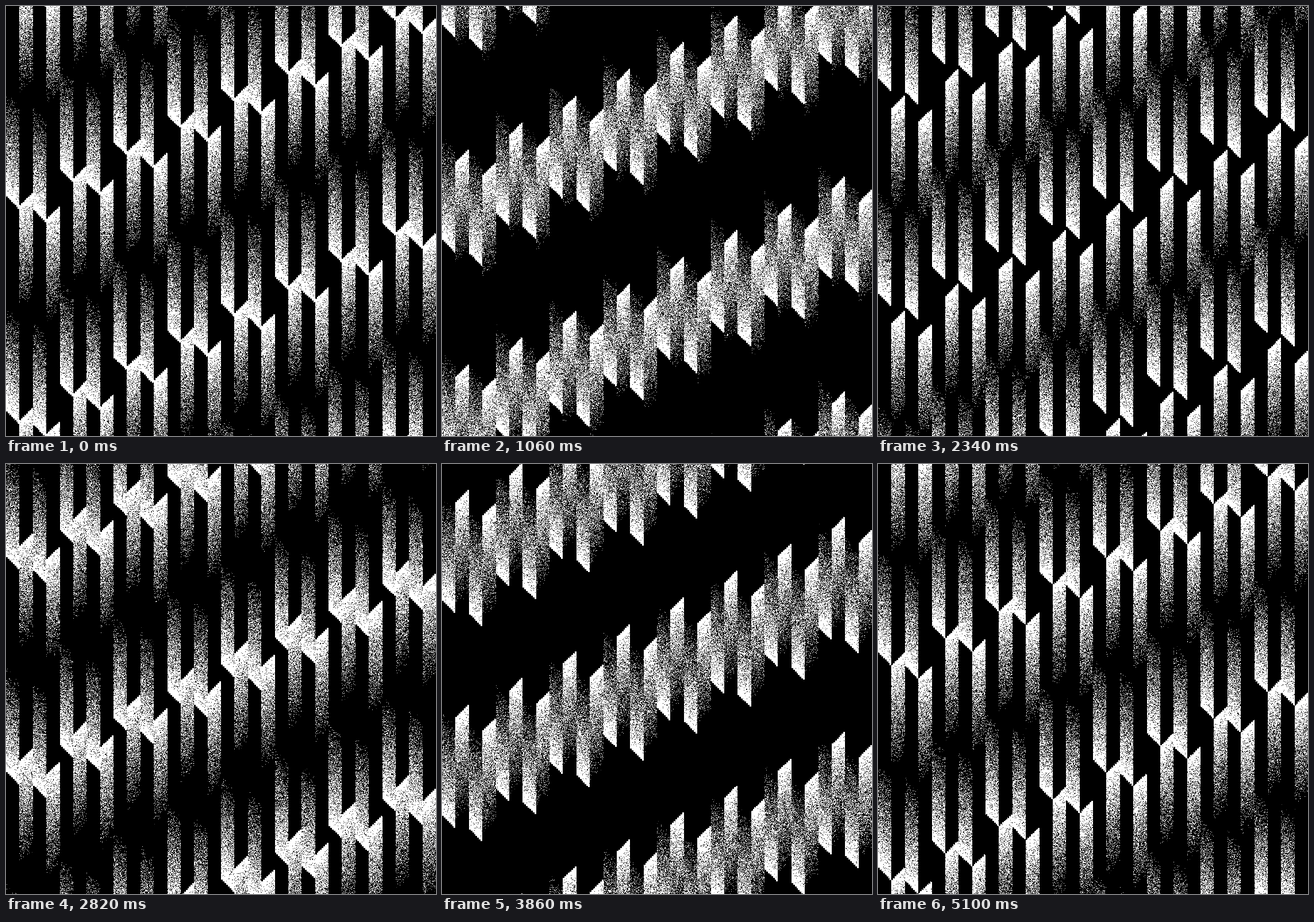
These frames come from a looping animation (748 by 748 pixels, 5120 ms). An HTML page without scripts:

```html
<!DOCTYPE html>
<html lang="en">
<head>
<meta charset="utf-8">
<title>Grain columns</title>
<style>
  html, body { margin: 0; width: 100%; height: 100%; overflow: hidden; background: #000; }
  /* strips averaged with the grain, then cut to pure black and white */
  .stage { position: relative; width: 748px; height: 748px; overflow: hidden; background: #000; filter: contrast(100); }
  svg { position: absolute; left: 0; top: 0; display: block; }
  .cols { width: 748px; height: 1122px; will-change: transform; animation: slide 5120ms step-end infinite; }
  .down { --d: 1; top: -374px; }
  .up { --d: -1; }
  .grain { width: 748px; height: 748px; opacity: .5; will-change: transform; }
  /* half a cell every 20 ms; the first pose is held for 40 ms */
  @keyframes slide {
    0% { transform: translateY(calc(var(--d) * 1.461px)); }
    0.78125% { transform: translateY(calc(var(--d) * 2.922px)); animation-timing-function: steps(254); }
    100% { transform: translateY(calc(var(--d) * 374px)); }
  }
</style>
</head>
<body>
<svg width="0" height="0" aria-hidden="true">
  <defs>
    <linearGradient id="fade" gradientUnits="userSpaceOnUse" x1="0" x2="0" y1="-15" y2="113" spreadMethod="repeat">
      <stop offset=".5" stop-color="#000"/>
      <stop offset="1" stop-color="#fff"/>
    </linearGradient>

    <!-- one column: eight strips, each a cell lower -->
    <rect id="strip" y="-512" width="1" height="1536" fill="url(#fade)"/>
    <g id="col" shape-rendering="crispEdges">
      <use href="#strip"/>
      <use href="#strip" x="1" y="1"/>
      <use href="#strip" x="2" y="2"/>
      <use href="#strip" x="3" y="3"/>
      <use href="#strip" x="4" y="4"/>
      <use href="#strip" x="5" y="5"/>
      <use href="#strip" x="6" y="6"/>
      <use href="#strip" x="7" y="7"/>
    </g>
    <g id="flip"><use href="#col" transform="translate(8 232) scale(1 -1)"/></g>

    <!-- columns doubled up to the full width -->
    <g id="a2"><use href="#col"/><use href="#col" x="16" y="8"/></g>
    <g id="a4"><use href="#a2"/><use href="#a2" x="32" y="-16"/></g>
    <g id="a8"><use href="#a4"/><use href="#a4" x="64" y="-32"/></g>
    <g id="b2"><use href="#flip"/><use href="#flip" x="16" y="8"/></g>
    <g id="b4"><use href="#b2"/><use href="#b2" x="32" y="-16"/></g>
    <g id="b8"><use href="#b4"/><use href="#b4" x="64" y="-32"/></g>

    <!-- two noises summed, then folded to an even spread of greys -->
    <filter id="noise" x="0" y="0" width="100%" height="100%" color-interpolation-filters="sRGB">
      <feTurbulence type="fractalNoise" baseFrequency=".618 .709" numOctaves="2" seed="4"/>
      <feColorMatrix values=".7 .7 0 0 -.2  .7 .7 0 0 -.2  .7 .7 0 0 -.2  0 0 0 0 1" result="n1"/>
      <feTurbulence type="fractalNoise" baseFrequency=".837 .573" numOctaves="2" seed="19"/>
      <feColorMatrix values=".7 .7 0 0 -.2  .7 .7 0 0 -.2  .7 .7 0 0 -.2  0 0 0 0 1" result="n2"/>
      <feComposite in="n1" in2="n2" operator="arithmetic" k1="0" k2="1" k3="1" k4="-.5"/>
      <feComponentTransfer>
        <feFuncR type="table" tableValues=".02 .97 .02 .97 .02 .97"/>
        <feFuncG type="table" tableValues=".02 .97 .02 .97 .02 .97"/>
        <feFuncB type="table" tableValues=".02 .97 .02 .97 .02 .97"/>
      </feComponentTransfer>
    </filter>
  </defs>
</svg>

<div class="stage">
  <svg class="cols down" viewBox="0 0 256 384"><use href="#a8"/><use href="#a8" x="128" y="-64"/></svg>
  <svg class="cols up" viewBox="0 0 256 384"><use href="#b8"/><use href="#b8" x="128" y="-64"/></svg>
  <svg class="grain" viewBox="0 0 748 748"><rect width="748" height="748" filter="url(#noise)"/></svg>
</div>
</body>
</html>
```
